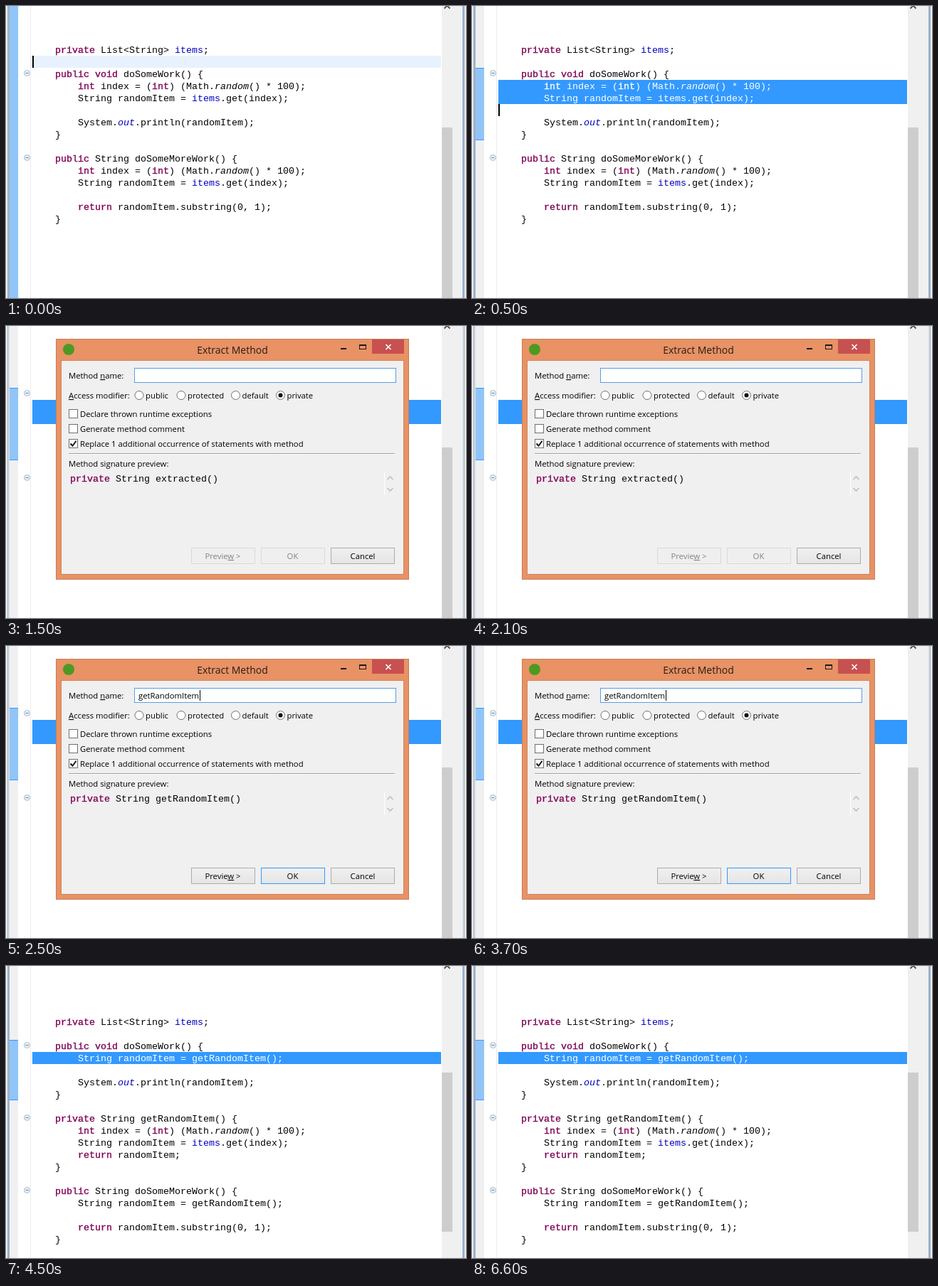
An HTML page that plays this animation: 646 px wide and 411 px high, repeating every 8 s.

```html
<!DOCTYPE html>
<html lang="en">
<head>
<meta charset="utf-8">
<title>Extract method</title>
<style>
html, body { margin: 0; width: 100%; height: 100%; overflow: hidden; background: #fff; }
svg { display: block; width: 646px; height: 411px; }
rect, line { shape-rendering: crispEdges; }

.mono { font: 13.333px "Liberation Mono", "Courier New", monospace; white-space: pre; }
.ui { font: 11.32px "Open Sans", "Noto Sans", sans-serif; }
.title { font-size: 14px; }
.mid { text-anchor: middle; }
.key { fill: #7f0055; stroke: #7f0055; stroke-width: .35px; }
.field { fill: #0000c0; }
.static { fill: #0000c0; font-style: italic; }
.call { font-style: italic; }
.picked, .picked tspan { fill: #fff; }
.picked .key { stroke: #fff; }
.mn { text-decoration: underline; }

.box { fill: #fff; stroke: #707070; }
.btn rect { fill: url(#face); stroke: #acacac; }
.btn.ok rect { stroke: #3399ff; }
.btn.off rect { fill: #efefef; stroke: #d9d9d9; }
.btn.off text { fill: #838383; }

/* stage changes at 0.5 s, 1.5 s, 2.5 s and 4.5 s of 8 s */
.start, .marked, .caret, .before, .dialog, .empty, .filled, .after {
  animation: 8s step-end infinite; visibility: hidden;
}
.start { animation-name: start; }
.marked { animation-name: marked; }
.caret { animation-name: caret; }
.before { animation-name: before; }
.dialog { animation-name: dialog; }
.empty { animation-name: empty; }
.filled { animation-name: filled; }
.after { animation-name: after; }
@keyframes start { 0% { visibility: visible } 6.25%, 100% { visibility: hidden } }
@keyframes marked { 0%, 56.25%, 100% { visibility: hidden } 6.25% { visibility: visible } }
@keyframes caret { 0%, 18.75%, 100% { visibility: hidden } 6.25% { visibility: visible } }
@keyframes before { 0% { visibility: visible } 56.25%, 100% { visibility: hidden } }
@keyframes dialog { 0%, 56.25%, 100% { visibility: hidden } 18.75% { visibility: visible } }
@keyframes empty { 0%, 31.25%, 100% { visibility: hidden } 18.75% { visibility: visible } }
@keyframes filled { 0%, 56.25%, 100% { visibility: hidden } 31.25% { visibility: visible } }
@keyframes after { 0% { visibility: hidden } 56.25%, 100% { visibility: visible } }

.edge { fill: #99b4d1; animation: edge 8s step-end infinite; }
@keyframes edge { 0%, 56.25%, 100% { fill: #99b4d1 } 18.75% { fill: #d3deea } }
</style>
</head>
<body>
<svg viewBox="0 0 646 411">
  <defs>
    <pattern id="hatch" width="2" height="2" patternUnits="userSpaceOnUse">
      <rect width="2" height="2" fill="#f0f0f0"/>
      <path d="M0 0h1v1h-1zM1 1h1v1h-1z" fill="#3399ff" shape-rendering="crispEdges"/>
    </pattern>
    <linearGradient id="face" x2="0" y2="1">
      <stop stop-color="#f0f0f0"/><stop offset="1" stop-color="#e5e5e5"/>
    </linearGradient>
    <g id="fold">
      <circle r="4" fill="#e6eff7" stroke="#a5bdd3"/>
      <path d="M-2 0h4" stroke="#6587a8"/>
    </g>
  </defs>

  <!-- editor frame -->
  <rect width="646" height="411" fill="#fff"/>
  <rect width="17" height="411" fill="#f0f0f0"/>
  <rect x="612" width="34" height="411" fill="#f0f0f0"/>
  <rect x="2" width="1" height="411" fill="#a0a9b4"/>
  <rect x="643" width="1" height="411" fill="#a0a9b4"/>
  <rect class="edge" x="3" width="2" height="411"/>
  <rect class="edge" x="641" width="2" height="411"/>
  <rect x="34" width="1" height="411" fill="#ececec"/>
  <path d="M615.5 3.5l4-4 4 4" fill="none" stroke="#505050" stroke-width="1.8"/>

  <g class="start">
    <rect x="5" width="12" height="411" fill="url(#hatch)"/>
    <rect x="37" y="70" width="574" height="17" fill="#e8f2fe"/>
    <rect x="37" y="70" width="2" height="17"/>
  </g>
  <g class="marked">
    <rect x="5" y="87" width="12" height="102" fill="url(#hatch)"/>
    <path d="M5 87.5h12M5 188.5h12" stroke="#3399ff"/>
    <rect x="37" y="104" width="574" height="34" fill="#3399ff"/>
  </g>
  <rect class="caret" x="37" y="138" width="2" height="17"/>

  <g class="before">
    <rect x="612" y="171" width="15" height="240" fill="#cdcdcd"/>
    <use href="#fold" x="29.5" y="94.5"/>
    <use href="#fold" x="29.5" y="213.5"/>
  </g>
  <g class="after">
    <rect x="612" y="150" width="15" height="224" fill="#cdcdcd"/>
    <rect x="5" y="104" width="12" height="85" fill="url(#hatch)"/>
    <path d="M5 104.5h12M5 188.5h12" stroke="#3399ff"/>
    <rect x="37" y="121" width="574" height="17" fill="#3399ff"/>
    <use href="#fold" x="29.5" y="111.5"/>
    <use href="#fold" x="29.5" y="213.5"/>
    <use href="#fold" x="29.5" y="315.5"/>
  </g>

  <g id="code" class="mono"></g>

  <g class="dialog ui">
    <rect x="70.5" y="18.5" width="495" height="338" fill="#e89265" stroke="#c67d57"/>
    <rect x="77.5" y="48.5" width="481" height="301" fill="#f0f0f0" stroke="#d2845c"/>
    <circle cx="88" cy="33" r="8" fill="#4c9a22"/>
    <text class="title mid" x="318" y="39" fill="#2a1c14">Extract Method</text>
    <rect x="470" y="31" width="8" height="2" fill="#1a1a1a"/>
    <path d="M496.5 26.5h9v6h-9zM496 27h10" fill="none" stroke="#1a1a1a" shape-rendering="crispEdges"/>
    <rect x="514" y="19" width="45" height="20" fill="#c75050"/>
    <path d="M533.5 26l7 7m0-7l-7 7" stroke="#fff" stroke-width="1.7"/>

    <text x="88" y="74">Method <tspan class="mn">n</tspan>ame:</text>
    <rect x="180.5" y="59.5" width="367" height="20" fill="#fff" stroke="#569de5"/>
    <text x="88" y="102"><tspan class="mn">A</tspan>ccess modifier:</text>
    <g id="radios"></g>
    <g id="checks"></g>
    <path d="M90.5 165.5l3 3.2 5-7" fill="none" stroke="#111" stroke-width="1.9"/>
    <rect x="88" y="179" width="458" height="1" fill="#a0a0a0"/>
    <rect x="88" y="180" width="458" height="1" fill="#fff"/>
    <text x="88" y="198">Method signature preview:</text>
    <rect x="531" y="206" width="1" height="32" fill="#fff"/>
    <path d="M535.5 216l4-4 4 4M535.5 228l4 4 4-4" fill="none" stroke="#bfbfbf" stroke-width="1.7"/>
    <g class="btn">
      <rect x="456.5" y="312.5" width="89" height="22"/>
      <text class="mid" x="501" y="328">Cancel</text>
    </g>
  </g>
  <g class="empty ui" id="empty"></g>
  <g class="filled ui" id="filled">
    <text x="186" y="74">getRandomItem</text>
    <rect x="272" y="62" width="1" height="15"/>
  </g>
</svg>

<script>
const $ = id => document.getElementById(id);
const add = (id, html) => $(id).insertAdjacentHTML('beforeend', html);

const esc = s => s.replace(/</g, '&lt;').replace(/>/g, '&gt;');
const styles = { items: 'field', out: 'static', random: 'call' };
const paint = s => esc(s).replace(
  /\b(private|public|void|int|return|items|out|random)\b/g,
  w => `<tspan class="${styles[w] || 'key'}">${w}</tspan>`);

// rows are 17px apart, columns 8px
function row(src, n, cls = '') {
  const text = src.trimStart();
  const x = 69 + 8 * (src.length - text.length);
  return text && `<text class="${cls}" x="${x}" y="${66 + 17 * n}">${paint(text)}</text>`;
}

const pick = [
  '    int index = (int) (Math.random() * 100);',
  '    String randomItem = items.get(index);'
];
const print = '    System.out.println(randomItem);';
const cut = '    return randomItem.substring(0, 1);';
const call = '    String randomItem = getRandomItem();';
const field = 'private List<String> items;';
const work = 'public void doSomeWork() {';
const more = 'public String doSomeMoreWork() {';

const before = [field, '', work, '', '', '', print, '}', '', more, ...pick, '', cut, '}'];
const after = ['', field, '', work, '', '', print, '}', '',
  'private String getRandomItem() {', ...pick, '    return randomItem;', '}', '',
  more, call, '', cut, '}'];

const rows = (list, from = 0, cls) => list.map((s, i) => row(s, i + from, cls)).join('');
add('code',
  `<g class="before">${rows(before)}</g>` +
  `<g class="start">${rows(pick, 3)}</g>` +
  `<g class="marked">${rows(pick, 3, 'picked')}</g>` +
  `<g class="after">${rows(after)}${row(call, 4, 'picked')}</g>`);

[['public', 187], ['protected', 246], ['default', 322.5], ['private', 385.5]].forEach(([name, x]) => {
  const dot = name === 'private' ? `<circle cx="${x}" cy="97.5" r="3" fill="#111"/>` : '';
  add('radios', `<circle class="box" cx="${x}" cy="97.5" r="6"/>${dot}<text x="${x + 9}" y="102">${name}</text>`);
});

['Declare thrown runtime exceptions', 'Generate method comment',
 'Replace 1 additional occurrence of statements with method'].forEach((label, i) => {
  const y = 117.5 + 21 * i;
  add('checks', `<rect class="box" x="88.5" y="${y}" width="12" height="12"/><text x="104" y="${y + 10.5}">${label}</text>`);
});

const button = (x, label, cls) => `<g class="btn ${cls}">
  <rect x="${x + .5}" y="312.5" width="89" height="22"/>
  <text class="mid" x="${x + 44.5}" y="328">${label}</text></g>`;

function form(id, method, state) {
  add(id, `<text class="mono" x="90" y="219">${paint(`private String ${method}()`)}</text>` +
    button(260, 'Previe<tspan class="mn">w</tspan> &gt;', state) +
    button(358, 'OK', state || 'ok'));
}
form('empty', 'extracted', 'off');
form('filled', 'getRandomItem', '');
</script>
</body>
</html>
```
